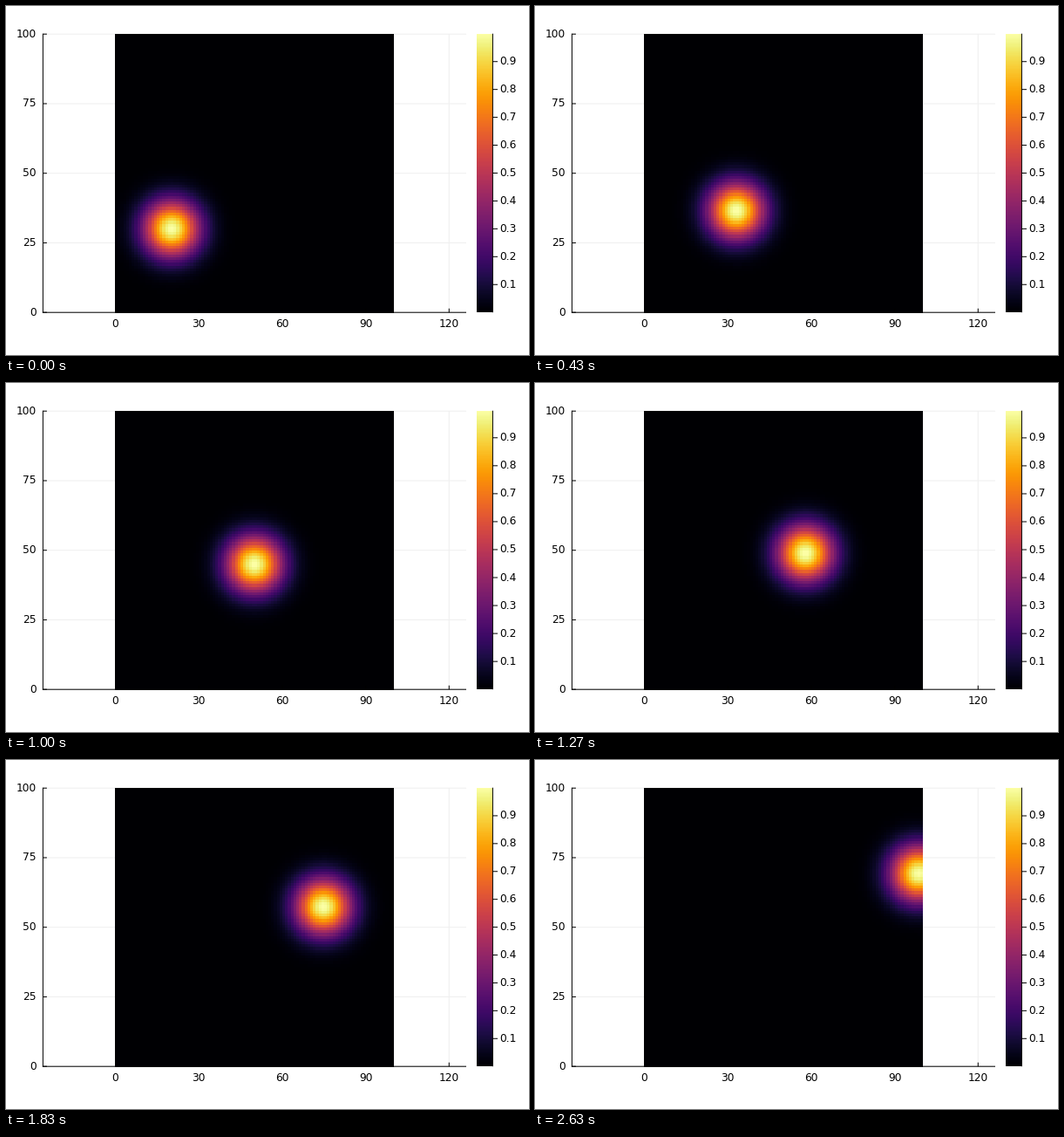
Write a matplotlib script that moves like this. It is 600x400 px and loops after 2660 ms.

```python
import numpy as np
import matplotlib.pyplot as plt
from matplotlib.animation import FuncAnimation

W, H, DPI = 600, 400, 100
LOOP_MS, TICK_MS = 2660, 10
STEPS_PER_TICK = 0.3             # 30 steps per second
UNIT = 3.19                      # pixels per data unit
LEFT, RIGHT, TOP, BOTTOM = 42.4, 528, 32.2, 351.2
BAR_L, BAR_R = 540, 558
GRID = "#efefef"

plt.rcParams["font.family"] = "DejaVu Sans"
plt.rcParams["font.size"] = 8.8

fig = plt.figure(figsize=(W / DPI, H / DPI), dpi=DPI, facecolor="white")
ax = fig.add_axes([0, 0, 1, 1])
ax.axis("off")


def px(x):
    return 125.5 + UNIT * x


def py(y):
    return BOTTOM - UNIT * y


def line(xs, ys, color="black", z=5):
    return ax.plot(xs, ys, color=color, lw=0.72, zorder=z, snap=False,
                   solid_capstyle="butt")[0]


def image(data, left, right, top, bottom):
    return ax.imshow(data, extent=(left, right, bottom, top), origin="lower",
                     cmap="inferno", aspect="auto", interpolation="nearest",
                     zorder=3)


# Travelling Gaussian on a 100 x 100 grid
grid = np.linspace(0, 100, 100)
X, Y = np.meshgrid(grid, grid)


def field(t):
    return np.exp(-((X - 20 - t) ** 2 + (Y - 30 - t / 2) ** 2) / 100)


heat = image(field(0), 125, 445, 32, 352)
image(np.linspace(0, 1, 256)[:, None], BAR_L, BAR_R, 32, 351)
ax.set_xlim(0, W)
ax.set_ylim(H, 0)

# Grid, axes and their labels
for v in (0, 25, 50, 75, 100):
    y = py(v)
    line([LEFT, RIGHT], [y, y], GRID, 1)
    line([LEFT, LEFT + 4.5], [y, y])
    ax.text(34.8, y, str(v), ha="right", va="center")
for v in (0, 30, 60, 90, 120):
    x = px(v)
    line([x, x], [TOP, BOTTOM], GRID, 1)
    line([x, x], [BOTTOM, BOTTOM - 4.5])
    ax.text(x, 364, str(v), ha="center", va="center")
line([LEFT, LEFT], [TOP - 0.5, BOTTOM + 0.5])
line([LEFT - 0.5, RIGHT], [BOTTOM, BOTTOM])

# Colour bar scale, which follows the highest sampled value
line([BAR_R + 0.4] * 2, [TOP - 0.5, BOTTOM])
levels = np.arange(1, 10) / 10
ticks = [line([BAR_R, BAR_R + 6], [0, 0]) for _ in levels]
labels = [ax.text(566.2, 0, f"{v:.1f}", ha="left", va="center")
          for v in levels]


def draw(tick_no):
    z = field(int((tick_no + 0.5) * STEPS_PER_TICK))
    peak = z.max()
    heat.set_data(z)
    heat.set_clim(0, peak)
    for v, tick, label in zip(levels, ticks, labels):
        y = py(100 * v / peak)
        tick.set_ydata([y, y])
        label.set_y(y)
    return [heat, *ticks, *labels]


anim = FuncAnimation(fig, draw, frames=LOOP_MS // TICK_MS, interval=TICK_MS,
                     repeat=True, repeat_delay=0, blit=False)
plt.show()
```
